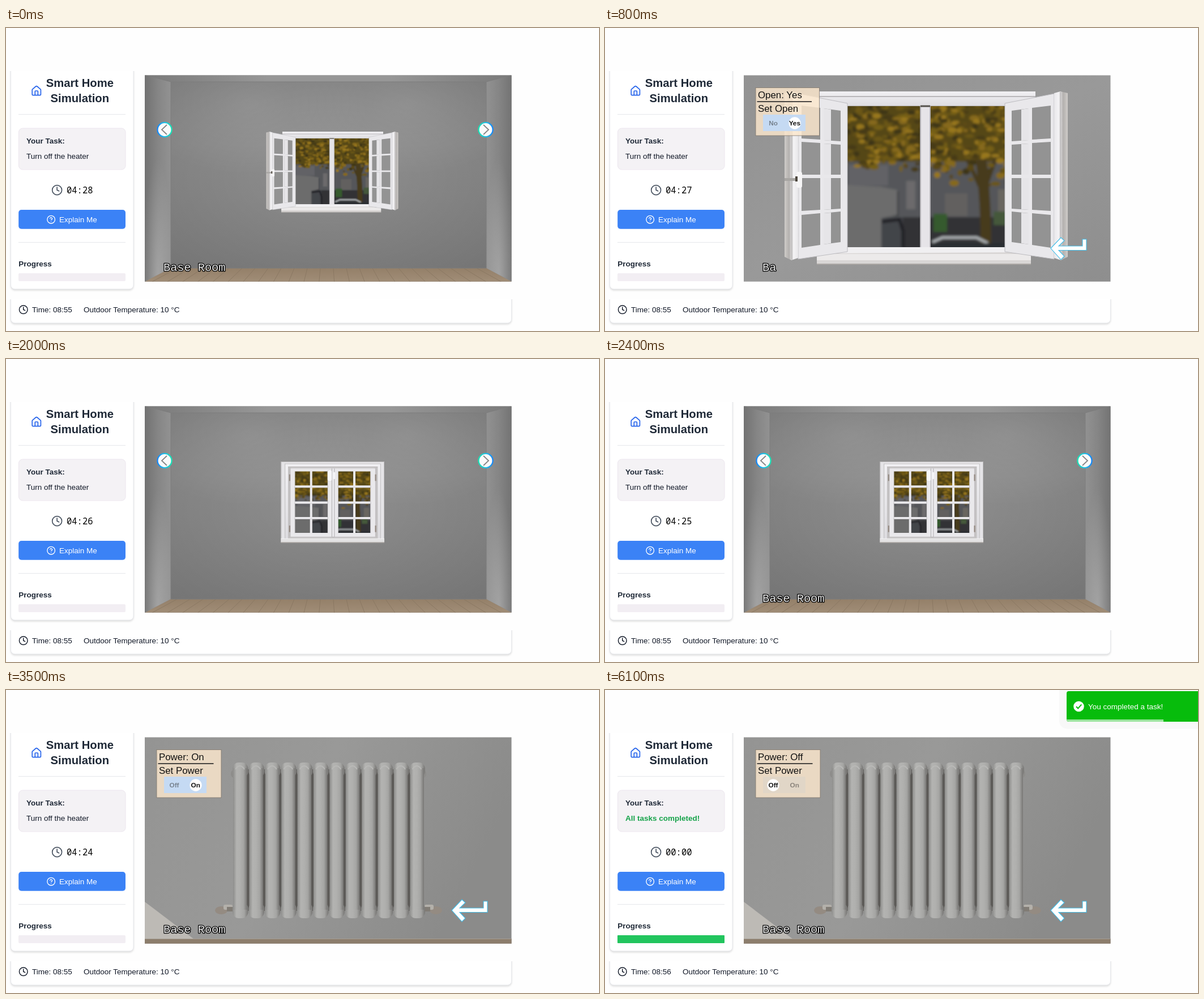
Animation, 1047 px wide and 535 px high, one loop 6200 ms. Source, as an HTML page:

```html
<!DOCTYPE html>
<html lang="en">
<head>
<meta charset="utf-8">
<title>Smart Home Simulation</title>
<style>
html, body { margin: 0; width: 100%; height: 100%; overflow: hidden; background: #fefefe; }
svg { display: block; }
text { font: 13.5px "Liberation Sans", Arial, sans-serif; fill: #111827; white-space: pre; }
.b { font-weight: 700; fill: #1f2937; }
.title { font-size: 20.25px; text-anchor: middle; }
.mono { font: 15.5px "Noto Sans Mono", monospace; fill: #000; }
.w { fill: #fff; }
.panel { font-size: 16.875px; fill: #111; }
.opt { font-size: 11.8px; font-weight: 700; text-anchor: middle; }
.caption { font: 20.25px "Liberation Mono", monospace; fill: #ededed; stroke: #000; stroke-width: 2.6px; paint-order: stroke; stroke-linejoin: round; }
.icon { fill: none; stroke-width: 2; stroke-linecap: round; stroke-linejoin: round; }
.card { fill: #fff; stroke: #e5e7eb; filter: drop-shadow(0 2px 1.5px rgba(0,0,0,.13)); }
</style>
</head>
<body>
<script>
let seed = 11;
const rnd = () => (seed = (seed * 16807) % 2147483647) / 2147483647;
const range = n => [...Array(n).keys()];
const rect = (x, y, w, h, fill, more = '') =>
  `<rect x="${x}" y="${y}" width="${w}" height="${h}" fill="${fill}" ${more}/>`;
const poly = (points, fill, more = '') => `<polygon points="${points}" fill="${fill}" ${more}/>`;
const path = (d, stroke, width = 1, more = '') =>
  `<path d="${d}" fill="none" stroke="${stroke}" stroke-width="${width}" ${more}/>`;
const text = (x, y, s, cls = '', id = '') => `<text x="${x}" y="${y}" class="${cls}" id="${id}">${s}</text>`;
const stops = colors => colors.map((c, i) => `<stop offset="${i / (colors.length - 1)}" stop-color="${c}"/>`).join('');
const grad = (id, dir, ...colors) => `<linearGradient id="${id}" ${dir}>${stops(colors)}</linearGradient>`;
const glow = (id, cx, cy, r, color, inner, outer) => `<radialGradient id="${id}" cx="${cx}" cy="${cy}" r="${r}">` +
  `<stop stop-color="${color}" stop-opacity="${inner}"/><stop offset="1" stop-color="${color}" stop-opacity="${outer}"/></radialGradient>`;
const down = 'x2="0" y2="1"';

// Autumn street behind the glass
function street() {
  const colors = ['#6b5615', '#86691a', '#584718', '#463b18', '#98771f', '#755e18', '#3d3618'];
  const leaves = range(520).map(() => {
    const x = 414 + rnd() * 312, y = 134 + rnd() * (x > 585 ? 138 : 116) * (.75 + rnd() * .35);
    return `<ellipse cx="${x.toFixed(1)}" cy="${y.toFixed(1)}" rx="${(3 + rnd() * 6).toFixed(1)}" ry="${(2 + rnd() * 4).toFixed(1)}" fill="${colors[rnd() * 7 | 0]}"/>`;
  }).join('');
  return `<svg x="418" y="138" width="304" height="250" viewBox="418 138 304 250"><g filter="url(#soft)">` +
    rect(408, 128, 324, 270, '#544718') + rect(408, 236, 324, 100, '#55565a') +
    rect(430, 242, 70, 36, '#626266') + rect(494, 288, 24, 44, '#2f3136') +
    rect(532, 270, 16, 50, '#6c6b6c') + rect(600, 292, 40, 40, '#62605e') +
    rect(694, 285, 20, 40, '#696660') +
    path('M665 300L690 230M662 280L632 215', '#463b1b', 7) + leaves +
    rect(408, 334, 324, 64, '#323335') + rect(580, 328, 24, 32, '#355a2e') + rect(686, 324, 22, 24, '#45593a') +
    path('M672 398Q674 320 664 232', '#463b1e', 19) +
    rect(480, 334, 46, 64, '#434448') + poly('408,276 486,280 516,286 516,330 488,336 488,398 408,398', '#6c6c6c') +
    path('M489 342L520 338L526 358V388', '#222327', 6) +
    path('M578 378L596 370H656L676 380', '#a9adb0', 5) + rect(576, 380, 156, 18, '#2b2d30') + '</g></svg>';
}

function sash() {
  const edge = (x, y) => y + (y - 262) * (x - 706) / 87 * .105;
  const panes = range(8).map(i => {
    const [a, b] = i % 2 ? [754, 787] : [718, 748], r = i >> 1;
    const top = 148 + r * 58.5, bottom = top + 53, mid = a + (b - a) * .55;
    const quad = (l, r) => [l, edge(l, top), r, edge(r, top), r, edge(r, bottom), l, edge(l, bottom)].map(Math.round);
    return poly(quad(a, b), '#939393') + (i % 2 ? '' : poly(quad(mid, b), '#e6e5e8'));
  }).join('');
  return poly('706,133 793,116 793,408 706,395', '#e9e8eb', 'stroke="#bdbcc0"') + panes +
    poly('793,115 804,112 817,115 817,404 805,410 793,406', 'url(#edge)') + path('M804 113V409', '#aaa8a8');
}

const openWindow = rect(378, 112, 382, 27, 'url(#rail)') + path('M378 121H760M424 138H710', '#b9b7ba', 2) +
  rect(418, 138, 298, 260, '#d8d7da') + street() + rect(556, 138, 19, 250, '#e6e4e8') +
  path('M557 138V388M574 138V388', '#b4b2b6', 2) + path('M557 138H574', '#55524c', 3) +
  rect(408, 387, 314, 11, '#f0eff1') + poly('374,398 722,396 752,408 752,418 374,418', '#d9d6d5') +
  rect(374, 399, 378, 11, '#eceaea') + path('M374 417H752', '#aba7a4', 2) +
  sash() + `<g transform="translate(1134) scale(-1 1)">${sash()}</g>` +
  rect(338, 254, 10, 28, '#f6f5f6', 'rx="3"') + rect(317, 265, 22, 5, '#a8a6a3') + rect(336, 262, 4, 9, '#4c463d');

const shutWindow = rect(365, 101, 410, 322, '#e5e4e7') + rect(381, 108, 379, 300, 'url(#rail)') +
  rect(393, 122, 356, 286, '#c4c2c3') + path('M366 102H774M380 110H760M393 122H749', '#aaa6a5', 1.5) +
  path('M381 110V408M760 110V408M366 102V408M774 102V408', '#bab8ba', 2) +
  rect(402, 127, 165, 274, '#eae9ec') + rect(577, 127, 163, 274, '#eae9ec') +
  street() +
  path('M413 127V398M727 127V398', '#eae9ec', 15) + path('M405 133H737M405 391H737', '#eae9ec', 14) +
  rect(550, 127, 42, 273, '#eae9ec') +
  path('M484.5 139V385M656 139V385', '#eae9ec', 9) + path('M420 200.5H550M592 200.5H720M420 264H550M592 264H720M420 325.5H550M592 325.5H720', '#eae9ec', 9) +
  path('M417 204H550M592 204H722M417 268H550M592 268H722M417 329H550M592 329H722M420 140V385M551 140V385M592 140V385M721 140V385', '#bdbbbd', 1.3) +
  path('M567 128V400M577 128V400', '#a9a7a9', 2) + path('M402 128V400H740V128Z', '#b5b3b4', 1.5) +
  rect(550, 134, 17, 46, '#f8f8fa', 'rx="7" stroke="#c5c3c6"') + rect(572, 143, 8, 28, '#f5f5f7', 'rx="3"') +
  [397, 738].map(x => rect(x, 152, 5, 26, '#948a82') + rect(x, 355, 5, 26, '#948a82')).join('') +
  rect(365, 407, 410, 15, '#e3e2e3') + path('M365 407H775', '#f7f7f8', 2) + path('M365 422H775', '#99928a', 2);

const valve = x => `<ellipse cx="${x}" cy="389" rx="11" ry="7" fill="#948b82"/>` + rect(x + 4, 379, 16, 9, '#b3b0aa', 'rx="3"') +
  rect(x + 10, 383, 20, 8, '#817c75');
const heater = rect(397, 141, 345, 14, '#8d8c8a', 'rx="6"') + rect(404, 140, 330, 250, '#5c5a57') +
  valve(380) + `<g transform="translate(1139) scale(-1 1)">${valve(380)}</g>` +
  range(12).map(i => {
    const x = 401 + i * 28.4;
    return rect(x - 1, 128, 27.5, 27, 'url(#tube)', 'rx="11"') +
      rect(x - 1, 375, 27.5, 28, 'url(#tube)', 'rx="11"') + rect(x, 138, 24.5, 250, 'url(#tube)') +
      path(`M${x + 4} 140Q${x + 12} 128 ${x + 20} 140`, '#b9b9b7', 2);
  }).join('');

const stage = fill => rect(245, 83, 648, 365, fill);
const backWall = fill => rect(291, 95, 557, 329, fill);
const sideWall = poly('245,83 291,95 291,424 245,448', 'url(#side)') + poly('245,83 291,95 291,424 245,448', 'url(#sideLow)');
const room = stage('#858585') + poly('245,83 893,83 848,95 291,95', 'url(#ceiling)') +
  sideWall + `<g transform="translate(1138.5) scale(-1 1)">${sideWall}</g>` +
  ['url(#wall)', 'url(#lampA)', 'url(#lampB)', 'url(#shade)'].map(backWall).join('') +
  poly('245,448 291,424 848,424 893,448', 'url(#floor)') +
  range(24).map(i => path(`M${302 + i * 23} 424L${258 + i * 26.8} 448`, '#877560', .8)).join('') +
  path('M245 83L291 95H848L893 83M291 95V424H848V95', '#7c7c7c');

const wayButton = (x, dir) => `<g transform="translate(${x} 179.5) scale(${dir} 1)">` +
  `<circle r="12.6" fill="#fbfbfb" stroke="url(#ring)" stroke-width="2.4"/>` + path('M4 -8.5L-5 0L4 8.5', '#858585', 1.8) + '</g>';

const clock = (x, y, size, color) => `<g class="icon" stroke="${color}" transform="translate(${x} ${y}) scale(${size / 24})">` +
  '<circle cx="12" cy="12" r="10"/><path d="M12 6V12L16 14"/></g>';

document.body.innerHTML = `<svg width="1047" height="535" viewBox="0 0 1047 535"><defs>
${grad('edge', '', '#e8e7ea', '#f4f3f5', '#b3b0ae', '#cfccc9')}${grad('rail', down, '#f1f0f3', '#dddce0')}
${grad('tube', '', '#8d8d8b', '#b3b3b1', '#b0b0ae', '#a5a5a3', '#777674')}
${grad('side', '', '#727272', '#858585', '#929292')}${grad('ceiling', '', '#7a7a7a', '#979797', '#979797', '#7a7a7a')}
${grad('wall', down, '#8c8c8c', '#919191', '#8c8c8c', '#868686')}${grad('floor', down, '#948069', '#a08d77')}
${grad('near', 'x2="1" y2="1"', '#929292', '#999999', '#8e8e8e')}${grad('plaster', 'x2="1" y2=".3"', '#949493', '#999998', '#8b8b8a')}
${grad('ring', '', '#1b87f5', '#1fc0e5', '#1fe0b4')}
${glow('lampA', .25, .12, .38, '#fff', .13, 0)}${glow('lampB', .75, .12, .38, '#fff', .13, 0)}
${glow('shade', .5, .5, .72, '#000', 0, .13)}${glow('sideLow', .5, 1, .6, '#fff', .25, 0)}
<filter id="soft"><feGaussianBlur stdDeviation="2"/></filter>
<clipPath id="stage">${rect(245, 83.5, 647.5, 364.3, '#000')}</clipPath>
<clipPath id="sideCard">${rect(0, 76, 240, 390, '#000')}</clipPath>
<clipPath id="footCard">${rect(0, 479, 910, 56, '#000')}</clipPath>
<clipPath id="toastBox">${rect(815, 2, 300, 54, '#000', 'rx="4"')}</clipPath>
<g id="open">${openWindow}</g><g id="shut">${shutWindow}</g><g id="heater">${heater}</g></defs>
<g clip-path="url(#sideCard)">${rect(8.5, 60, 216.5, 401, '', 'rx="7" class="card"')}</g>
<g clip-path="url(#footCard)">${rect(8.5, 465, 884, 56, '', 'rx="7" class="card"')}</g>
<g class="icon" stroke="#2563eb" transform="translate(43.7 100.9) scale(.84375)"><path d="M15 21v-8a1 1 0 0 0-1-1h-4a1 1 0 0 0-1 1v8M3 10a2 2 0 0 1 .709-1.528l7-6a2 2 0 0 1 2.582 0l7 6A2 2 0 0 1 21 10v9a2 2 0 0 1-2 2H5a2 2 0 0 1-2-2z"/></g>
${text(130.3, 104, 'Smart Home', 'b title')}${text(130.3, 131, 'Simulation', 'b title')}
${path('M22 152.5H211M22 378.5H211', '#e5e7eb')}
${rect(22.5, 177, 188.5, 73, '#f4f2f5', 'rx="7" stroke="#ece6ee"')}
${text(36, 204, 'Your Task:', 'b')}${text(36, 231, '', '', 'task')}
${clock(80, 276, 20.25, '#4b5563')}${text(107, 291.5, '', 'mono', 'timer')}
${rect(22.2, 321, 188.8, 33.75, '#3b82f6', 'rx="5"')}
<g class="icon" stroke="#fff" transform="translate(71.5 330) scale(.68)"><circle cx="12" cy="12" r="10"/><path d="M9.1 9a3 3 0 0 1 5.8 1c0 2-3 3-3 3M12 17h.01"/></g>
${text(94, 343, 'Explain Me', 'w')}
${text(22.3, 421, 'Progress', 'b')}${rect(22, 433, 189, 14, '#f2eef3', 'rx="2"')}${rect(22, 433, 0, 14, '#22c55e', 'rx="1" id="progress"')}
${clock(22, 488.5, 17.5, '#111827')}${text(46, 502, '', '', 'time')}${text(137, 502, 'Outdoor Temperature: 10 °C')}
<g clip-path="url(#stage)">
<g id="roomView">${room}<use id="item"/>${wayButton(280, 1)}${wayButton(847, -1)}</g>
<g id="closeView">
<g id="windowWall">${stage('url(#near)')}</g>
<g id="heaterWall">${stage('url(#plaster)')}${poly('245,374 332,440 245,440', '#bdbab5')}${rect(245, 439, 648, 9, '#8c7d6c')}${path('M245 439.5H893', '#a59d92')}</g>
<use id="big"/>
${rect(266, 105.5, 112.5, 84.5, 'rgba(253,232,205,.82)', 'stroke="#80776c" stroke-width=".8" id="panel"')}
${text(270, 124, '', 'panel', 'status')}${rect(268.5, 129.2, 96.5, 1.6, '#222', 'id="rule"')}${text(270, 148, '', 'panel', 'setter')}
${rect(279, 153, 75, 29, '#c5daf3', 'id="track"')}<circle id="knob" cy="168" r="10.7" fill="#fff"/>
${text(297, 172, '', 'opt', 'off')}${text(334.8, 172, '', 'opt', 'on')}
${poly('787,389 805,370 811,375.5 801,385 843,385 843,373 850,373 850,392.5 801,392.5 811,403 805,409', '#fff', 'stroke="#3fbdea" stroke-width="1.1"')}
</g>${text(278, 429, '', 'caption', 'caption')}</g>
<g id="toast">${rect(802, -20, 330, 88.5, '#f8f8f8', 'rx="14"')}
<g clip-path="url(#toastBox)">${rect(815, 2, 300, 54, '#07bc0c')}${rect(815, 52, 300, 4, '#9be49e', 'id="bar"')}</g>
<circle cx="836.5" cy="29" r="9.3" fill="#fff"/>${path('M832 29.3L835.2 32.5L841.3 25.7', '#07bc0c', 2)}
${text(853, 33.7, 'You completed a task!', 'w')}</g></svg>`;

const $ = id => document.getElementById(id);
const show = (id, on) => $(id).style.display = on ? '' : 'none';
const write = (id, s) => $(id).textContent = s;
const set = (id, name, value) => $(id).setAttribute(name, value);
const clamp = v => Math.max(0, Math.min(1, v));

// Overshooting entry from the right
function bounce(p) {
  const keys = [[0, 3000], [.6, -25], [.75, 10], [.9, -5], [1, 0]];
  const i = keys.findIndex(k => p <= k[0]);
  if (i <= 0) return i ? 0 : 3000;
  const [a, from] = keys[i - 1], [b, to] = keys[i], u = (p - a) / (b - a);
  return from + (to - from) * (1 - (1 - u) ** 3);
}

function draw(t) {
  const done = t >= 3900, atHeater = t >= 2600, near = (t >= 700 && t < 2000) || t >= 3000;
  const closed = t >= 1400;
  show('roomView', !near);
  show('closeView', near);
  show('windowWall', !atHeater);
  show('heaterWall', atHeater);

  const item = atHeater ? '#heater' : closed ? '#shut' : '#open';
  const place = atHeater ? 'translate(341.4 257) scale(.4)'
    : closed ? 'translate(323.1 136.1) scale(.445)' : 'translate(311.8 130.8) scale(.466)';
  const hover = (t >= 400 && t < 700) || (t >= 2900 && t < 3000);
  const [cx, cy] = atHeater ? [569, 363] : [576.5, 255];
  set('item', 'href', item);
  set('item', 'transform', (hover ? `translate(${cx} ${cy}) scale(1.07) translate(${-cx} ${-cy}) ` : '') + place);
  set('big', 'href', item);

  const label = atHeater ? 'Power' : 'Open', [no, yes] = atHeater ? ['Off', 'On'] : ['No', 'Yes'];
  const isOn = atHeater ? !done : !closed;
  const slide = clamp((t - (atHeater ? 3700 : 1200)) / 200);
  write('status', `${label}: ${isOn ? yes : no}`);
  write('setter', `Set ${label}`);
  write('off', no);
  write('on', yes);
  set('panel', 'width', atHeater ? 114 : 112.5);
  set('rule', 'width', atHeater ? 98 : 96.5);
  set('knob', 'cx', 335 - 38 * slide);
  set('track', 'fill', slide < 1 ? '#c5daf3' : '#e1d6c7');
  $('off').style.fill = slide < 1 ? '#77828e' : '#111';
  $('on').style.fill = slide < 1 ? '#111' : '#8a837b';

  const start = [700, 1400, 2000, 3050, 3950].filter(s => s <= t).pop();
  const typed = start === undefined ? 9 : start === 1400 ? +(t >= 1500) : Math.floor((t - start) / 44);
  write('caption', 'Base Room'.slice(0, typed));

  const ticks = [200, 1100, 2100, 3100].filter(s => s <= t).length;
  write('timer', done ? '00:00' : `04:${28 - ticks}`);
  write('time', `Time: 08:${done ? 56 : 55}`);
  write('task', done ? 'All tasks completed!' : 'Turn off the heater');
  $('task').style.cssText = done ? 'font-weight:700;fill:#16a34a' : '';
  set('progress', 'width', 189 * (1 - (1 - clamp((t - 3800) / 500)) ** 2));

  show('toast', t >= 3800);
  set('toast', 'transform', `translate(${bounce(clamp((t - 3700) / 700))})`);
  set('bar', 'width', Math.min(300, 171 + (6100 - t) * .0555));
}

const begin = performance.now();
function frame() {
  const t = Math.max(0, performance.now() - begin) % 6200;
  draw(Math.floor(t / 100) * 100);
  requestAnimationFrame(frame);
}
frame();
</script>
</body>
</html>
```
